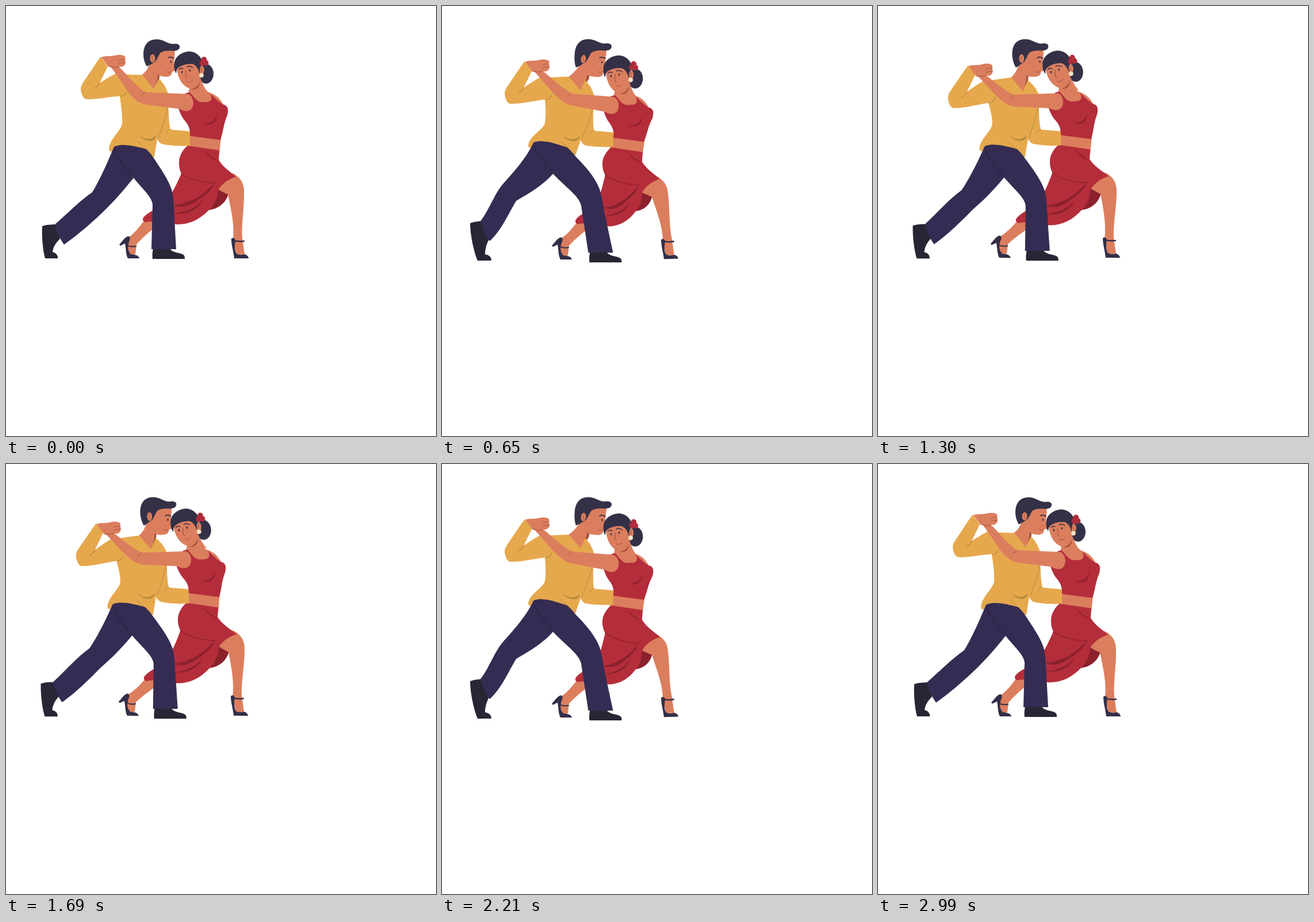
An HTML page that plays this animation: 748x748 px, repeating every 3.12 s.

```html
<!DOCTYPE html>
<html lang="en">
<head>
<meta charset="utf-8">
<title>Dancing couple</title>
<style>
  html, body { margin: 0; width: 100%; height: 100%; overflow: hidden; background: #fff; }
  svg { display: block; width: 100vw; height: 100vh; }
</style>
</head>
<body>
<svg id="stage" viewBox="0 0 748 748"></svg>
<script>
const STEP = 130, LAST = 5, HALF = 780;
const SKIN = '#db7e5e', SKIN_DARK = '#9c4f38', HAIR = '#343147', SHIRT = '#e6a84d', SHIRT_DARK = '#b4873c',
  TROUSERS = '#352c53', TROUSERS_DARK = '#262040', BLACK = '#282634', RED = '#b42d3a', RED_DARK = '#8b212d',
  HEEL = '#322e48', PEARL = '#f5e3c3';

const stage = document.getElementById('stage');
const shapes = [];

// A move eases to (dx, dy) and bows out by (bx, by) halfway.
const move = (dx, dy, bx = 0, by = 0) => u => {
  const ease = u ** 1.5, bow = Math.sin(Math.PI * u);
  return [dx * ease + bx * bow, dy * ease + by * bow];
};

// Moving least squares: each joint is [x, y, move].
function warp(x, y, joints, u) {
  const rows = joints.map(([a, b, shift]) => {
    const [dx, dy] = shift(u);
    return { w: 1 / ((a - x) ** 2 + (b - y) ** 2 + 4) ** 1.5, a, b, c: a + dx, d: b + dy };
  });
  const total = rows.reduce((s, r) => s + r.w, 0);
  const mean = key => rows.reduce((s, r) => s + r.w * r[key], 0) / total;
  const px = mean('a'), py = mean('b'), qx = mean('c'), qy = mean('d');
  let re = 0, im = 0, norm = 0;
  for (const r of rows) {
    const e = r.a - px, f = r.b - py, g = r.c - qx, h = r.d - qy;
    re += r.w * (e * g + f * h);
    im += r.w * (e * h - f * g);
    norm += r.w * (e * e + f * f);
  }
  if (norm < 1e-12) re = norm = 1;
  const vx = x - px, vy = y - py;
  return [qx + (re * vx - im * vy) / norm, qy + (im * vx + re * vy) / norm];
}

function add(joints, d, attrs) {
  const el = document.createElementNS('http://www.w3.org/2000/svg', 'path');
  for (const key in attrs) el.setAttribute(key, attrs[key]);
  stage.append(el);
  const poses = Array.from({ length: LAST + 1 }, (_, pose) =>
    d.replace(/([\d.]+) ([\d.]+)/g, (m, x, y) =>
      warp(+x, +y, joints, pose / LAST).map(n => n.toFixed(2)).join(' ')));
  shapes.push({ el, poses });
}
const fill = (joints, color, d) => add(joints, d, { fill: color });
const line = (joints, color, width, d) => add(joints, d,
  { fill: 'none', stroke: color, 'stroke-width': width, 'stroke-linecap': 'round', 'stroke-linejoin': 'round' });
function oval(joints, color, x, y, rx, ry = rx) {
  const a = rx * .5523, b = ry * .5523;
  fill(joints, color, `M${x - rx} ${y}C${x - rx} ${y - b} ${x - a} ${y - ry} ${x} ${y - ry}` +
    `C${x + a} ${y - ry} ${x + rx} ${y - b} ${x + rx} ${y}C${x + rx} ${y + b} ${x + a} ${y + ry} ${x} ${y + ry}` +
    `C${x - a} ${y + ry} ${x - rx} ${y + b} ${x - rx} ${y}Z`);
}

// How the man moves
const grip = move(-21, 8, -11, 25);
const shoulder = move(-19, 6, -7, 19);
const collar = move(-16, 3, -6, 7);
const chest = move(-18, 1, -2, 1);
const farArm = move(-22, 2, 0, -1);
const waist = move(-23, -1, -2, 2);
const hips = move(-29, -7);
const belly = move(-26, -3);
const backKnee = move(-39, -20, -2, -3);
const shin = move(-18, -6, -3);
const heel = move(-14, -5, -2, -1);
const toe = move(-6, 4);
const frontKnee = move(-13, 2, 5, 3);
const frontFoot = move(1.5, 6, 4.5, 4);
const brow = move(-8.5, .5, -8);

// How the woman moves
const face = move(-12, 7, -7, -1);
const flower = move(-11, 8, -9, -7);
const elbow = move(-16, 2, -6, 8);
const bodice = move(-18.5, 5, -4, -3);
const belt = move(-22, 3, 0, -3);
const thigh = move(-21, 4, 5, -2);
const hem = move(-6, 3.5, 4, 2);
const ankle = move(-11, 1, 0, -2);
const backAnkle = move(-6, 2, -1, -2);

const neck = [[237, 120, collar], [257, 144, collar]];
const upperArm = [[192, 117, shoulder], [200, 157, shoulder]];
const beltLine = [[317, 234, belt], [372, 242, belt]];

// Woman: legs and skirt
const backLeg = [[214, 402, backAnkle], [222, 439, backAnkle], [250, 380, hem]];
fill(backLeg, SKIN, 'M238 376L256 370L258 386C245 396 232 409 227 415L225 432L216 433L210 416L215 401C222 396 231 386 238 376Z');
fill(backLeg, HEEL, 'M211 401C216 399 217 405 214 410C211 419 212 426 217 432C225 432 231 434 232 439L212 439C208 432 209 422 207 413L199 417L197 415C202 410 206 403 211 401Z');
line(backLeg, HEEL, 2, 'M210 416C215 419 221 419 226 418');

const skirt = [...beltLine, [301, 275, belt], [370, 268, belt], [400, 297, thigh], [386, 327, thigh],
  [238, 372, hem], [298, 380, hem]];
const frontLeg = [[414, 320, thigh], [386, 327, thigh], [403, 405, ankle], [407, 439, ankle]];
fill(skirt, RED_DARK, 'M355 300L387 326C383 342 370 353 352 355L335 350Z');
fill(frontLeg, SKIN, 'M364 316L372 288L395 291C409 299 413 308 414 320C415 350 409 380 411 404L415 432L401 433L395 408C398 380 391 352 386 328C380 325 374 322 364 316Z');
fill(frontLeg, HEEL, 'M392 405C395 402 399 404 399 409C397 418 398 426 401 431C407 434 413 432 416 432C420 434 422 436 422 439L397 439C396 428 392 416 392 405Z');
line(frontLeg, HEEL, 2.4, 'M394 407C401 410 407 410 414 409');

const torsoW = [...beltLine, [316, 151, bodice], [362, 156, bodice], [386, 180, bodice]];
fill(torsoW, SKIN, 'M316 222L374 229L371 258L314 252Z');
fill(skirt, RED, 'M316 243L371 251L370 268C378 281 390 288 400 297C386 301 375 310 369 320C368 333 363 346 353 355C336 372 319 380 298 380C276 378 258 373 243 376C238 376 237 371 239 368C245 360 262 352 275 345C290 325 298 308 305 291C300 282 300 268 303 261C306 253 311 247 316 243Z');
fill(skirt, RED_DARK, 'M291 346C319 345 348 326 362 308C359 320 347 329 335 337C320 348 303 353 291 346Z');
fill(skirt, RED_DARK, 'M290 361C312 359 331 352 342 337C336 352 318 364 290 361Z');
line(skirt, RED_DARK, 1.3, 'M305 291C319 302 342 307 364 308');
fill(skirt, RED_DARK, 'M344 249C351 259 360 264 369 270C359 267 349 260 344 249Z');

// Woman: torso
fill(torsoW, SKIN, 'M319 143L338 128C343 140 348 149 355 151C366 155 374 162 378 172L350 182L315 165Z');
fill(torsoW, RED, 'M312 152L319 150C327 156 331 170 346 167C356 168 361 162 355 152C365 161 373 170 380 172C387 175 387 181 385 190C378 206 378 219 373 233L319 226C322 214 316 205 309 197C303 188 301 181 299 174Z');
fill(torsoW, RED_DARK, 'M344 204C356 206 364 199 367 189C368 202 356 210 344 204Z');

// Man: head
const head = [[240, 87, brow], [287, 96, brow], [280, 123, brow], ...neck];
fill(head, SKIN, 'M258 74L293 73C295 82 292 92 292 99L295 110C295 113 293 113 289 114C289 119 286 123 279 123C274 123 270 122 267 121L267 126L262 136L257 146L235 121C243 115 247 109 249 102Z');
fill(head, HAIR, 'M245 105C241 99 239 91 239 84C239 68 247 58 262 58C275 58 280 66 291 66C298 65 303 67 302 72C301 77 296 78 290 78C280 77 274 78 269 81C265 86 264 91 260 96L251 102Z');
oval(head, SKIN, 255, 91, 4.5, 7);
line(head, SKIN_DARK, .9, 'M256 87C252 89 254 92 256 95');
fill(head, SKIN_DARK, 'M267 121C266 130 263 134 260 138C262 131 264 126 264 119Z');
line(head, HAIR, 1.8, 'M283 90C286 88 289 89 292 91');
oval(head, HAIR, 287, 97, 1.2, 2);
line(head, SKIN_DARK, 1, 'M280 113C281 116 284 116 287 114');

// Man: shirt
const torso = [...upperArm, ...neck, [280, 150, chest], [202, 205, waist], [179, 248, hips],
  [258, 263, belly], [320, 230, farArm], [266, 236, farArm]];
const sleeve = [...upperArm, neck[0], [165, 88, grip], [163, 134, grip], [131, 145, grip], [137, 162, grip]];
fill(torso, SHIRT, 'M192 117C205 120 223 119 237 120L257 144L266 126C273 133 279 142 282 153C283 175 282 198 286 215L320 218L320 243C304 244 283 243 271 240C267 238 264 235 263 231L258 263L244 256L187 254L181 253C178 250 179 245 181 240C187 226 200 215 202 205C203 190 200 173 198 157L190 140Z');
fill(sleeve, SHIRT, 'M165 88L177 105L163 134C175 126 184 121 192 117L215 121L210 149C207 155 202 157 196 157C177 158 158 163 139 162C134 161 130 151 130 143C131 137 135 132 139 126C148 113 157 98 165 88Z');
line(sleeve, SHIRT_DARK, 1.2, 'M163 134C161 138 158 141 154 143');
line(sleeve, SHIRT_DARK, 1.2, 'M210 149C207 155 203 157 199 157');
line(torso, SHIRT_DARK, 1, 'M281 176C278 194 272 210 265 229');
line(torso, SHIRT_DARK, 1, 'M286 215C282 215 280 218 278 221');
fill(torso, SHIRT_DARK, 'M228 221C239 233 254 235 261 224C260 238 242 239 228 221Z');
line(torso, SHIRT_DARK, 1, 'M230 236C234 241 237 244 241 247');

// Man: shoes and trousers
const backShoe = [[62, 384, heel], [87, 380, shin], [82, 428, toe], [68, 439, toe]];
fill(backShoe, BLACK, 'M63 383C71 380 80 380 89 380L94 405C86 412 82 420 81 428C86 429 91 433 90 439L68 439C64 425 62 401 63 383Z');
fill([[282, 432, frontFoot]], BLACK, 'M256 421L284 421C291 431 303 428 309 433C311 435 311 437 311 440L255 440C254 433 255 427 256 421Z');
const legs = [[187, 246, hips], [222, 299, hips], [244, 249, belly],
  [150, 324, backKnee], [168, 359, backKnee], [85, 380, shin], [101, 415, shin],
  [288, 319, frontKnee], [255, 345, frontKnee], [253, 423, frontFoot], [296, 423, frontFoot]];
fill(legs, TROUSERS, 'M187 247C188 243 193 243 199 242C216 241 231 246 244 249C249 254 254 259 258 266C269 283 282 301 288 319C291 331 292 342 292 352L296 423L253 423L255 345C253 331 238 319 222 299C205 320 188 340 168 359C147 379 125 398 101 415C94 405 88 393 85 380C107 361 128 339 150 324C163 303 177 271 187 247Z');
line(legs, TROUSERS_DARK, 1.2, 'M188 249C192 262 205 279 220 295');

// Woman: head
const headW = [[306, 114, face], [345, 96, flower]];
oval(headW, HAIR, 348, 118, 13, 17);
fill(headW, SKIN, 'M320 143L338 125C343 138 347 146 351 149L321 152Z');
fill(headW, SKIN_DARK, 'M322 145C331 143 335 138 338 131C337 140 332 147 322 145Z');
fill(headW, SKIN, 'M297 108C300 100 309 94 321 95C331 96 336 102 338 108C342 102 346 109 344 116C342 122 339 123 338 125C337 135 329 145 321 144C309 141 299 129 297 108Z');
fill(headW, HAIR, 'M296 117C292 111 292 104 293 97C296 86 308 79 320 79C331 80 338 87 341 95C342 101 340 104 338 107C336 110 338 114 337 118C335 111 332 104 325 101C315 100 303 103 298 109C296 112 297 114 296 117Z');
oval(headW, SKIN, 341, 111, 3.6, 7);
line(headW, SKIN_DARK, 1, 'M342 107C338 108 339 112 341 115');
for (let i = 0; i < 3; i++) {
  const turn = i * 2.1 - 1.6;
  oval(headW, RED, 344.5 + 3.5 * Math.cos(turn), 97 + 4 * Math.sin(turn), 4.8);
}
line(headW, RED_DARK, .8, 'M342 92C344 95 347 93 347 91M338 100L343 99M346 100L350 98');
oval(headW, PEARL, 340, 120.5, 4);
line(headW, HAIR, 1.5, 'M301 110C303 108 306 108 308 109M315 106C318 104 322 105 325 107');
oval(headW, HAIR, 306, 115, 1.3, 2);
oval(headW, HAIR, 320, 112, 1.3, 2);
line(headW, SKIN_DARK, 1, 'M313 112L313 124L316 125M315 131C319 134 322 132 325 129');

// Joined arms
const arm = [[190, 108, grip], [232, 160, elbow], [318, 153, bodice], [303, 180, bodice]];
fill(arm, SKIN, 'M176 104L196 105C211 120 225 138 242 150L317 153C326 157 328 169 324 177C319 185 310 184 302 179L241 171C230 168 223 162 217 155C206 142 196 124 183 107Z');
line(arm, SKIN_DARK, 1, 'M242 150C240 152 238 154 235 155');
const hand = [[165, 88, grip]];
fill(hand, SKIN, 'M166 89C174 86 183 88 189 86C197 84 205 85 207 88C208 90 207 92 207 94C209 97 208 101 206 103C203 107 198 106 194 105L191 108L177 104Z');
line(hand, SKIN_DARK, .9, 'M196 95C199 92 203 94 207 93M197 100C200 98 204 99 207 98M178 104C184 107 191 108 196 105');

// The sway runs forth for one half, then back for the next.
function poseAt(ms) {
  const t = ms % (2 * HALF), step = Math.floor(t % HALF / STEP);
  return t < HALF ? step : LAST - step;
}
let shown = -1;
function draw(ms) {
  const pose = poseAt(ms);
  if (pose === shown) return;
  for (const s of shapes) s.el.setAttribute('d', s.poses[pose]);
  shown = pose;
}
const start = performance.now();
function tick() {
  draw(performance.now() - start);
  requestAnimationFrame(tick);
}
draw(0);
requestAnimationFrame(tick);
</script>
</body>
</html>
```
